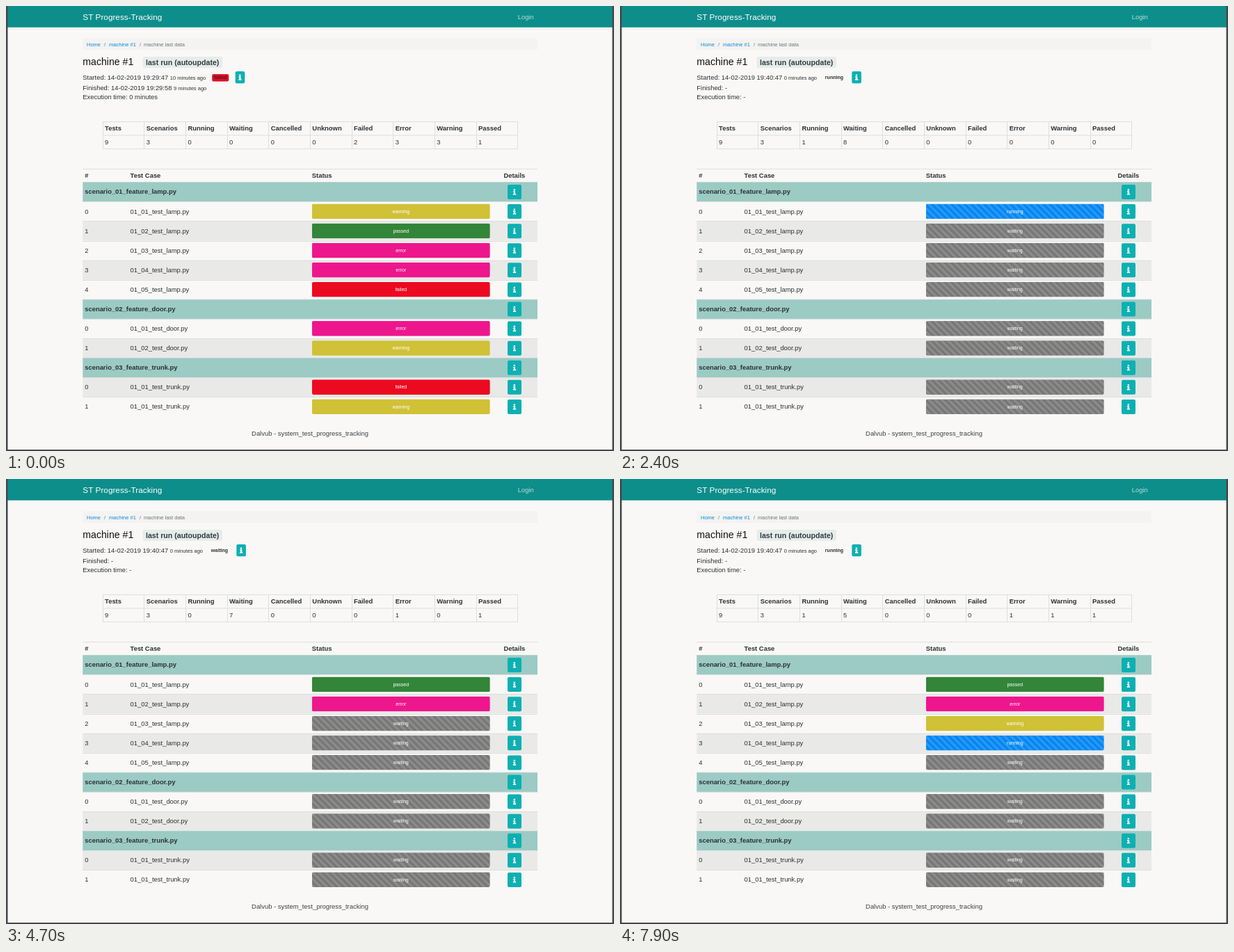
Recreate the animation shown at these times as an HTML page with a canvas. Size 874 by 640 pixels, loop 8000 ms.

```html
<!DOCTYPE html>
<html lang="en">
<head>
<meta charset="utf-8">
<title>Test progress</title>
<style>
  html, body { margin: 0; width: 100%; height: 100%; overflow: hidden; background: #f9f8f6; }
  canvas { display: block; width: 874px; height: 640px; }
</style>
</head>
<body>
<canvas id="stage" width="874" height="640"></canvas>
<script>
const ctx = document.getElementById('stage').getContext('2d');

const LOOP = 8000, TICK = 100;
const REM = 9.424, SMALL = REM * 0.8, TINY = REM * 0.75;
const INK = '#2c3034', LINE = '#dcdfe0', TEAL = '#0db0b2';
const LEFT = 110.3, RIGHT = 764;
const ROW_TOP = 253.3, ROW_H = 28.08;
const BAR_X = 439.8, BAR_W = 256, BAR_H = 21.7;

const COLORS = {
  warning: '#d0c136', passed: '#338539', error: '#ee168d',
  failed: '#ec0a20', running: '#0286f3', waiting: '#777777'
};
const LETTERS = { w: 'warning', p: 'passed', e: 'error', f: 'failed', r: 'running', '.': 'waiting' };

// Each step: start time, one letter per test, overall status
const STEPS = [
  [0, 'wpeefewfw', 'failed'],
  [500, 'r........', 'running'],
  [2500, 'p........', 'waiting'],
  [3000, 'pr.......', 'running'],
  [4500, 'pe.......', 'waiting'],
  [5000, 'per......', 'running'],
  [7000, 'pewr.....', 'running']
];

const HEADS = ['Tests', 'Scenarios', 'Running', 'Waiting', 'Cancelled',
  'Unknown', 'Failed', 'Error', 'Warning', 'Passed'];

const SCENARIOS = [
  ['scenario_01_feature_lamp.py', [1, 2, 3, 4, 5].map(n => `01_0${n}_test_lamp.py`)],
  ['scenario_02_feature_door.py', ['01_01_test_door.py', '01_02_test_door.py']],
  ['scenario_03_feature_trunk.py', ['01_01_test_trunk.py', '01_01_test_trunk.py']]
];

function rect(x, y, w, h, color) {
  ctx.fillStyle = color;
  ctx.fillRect(x, y, w, h);
}

function box(x, y, w, h, r, color) {
  ctx.fillStyle = color;
  ctx.beginPath();
  ctx.roundRect(x, y, w, h, r);
  ctx.fill();
}

// Draws text and returns the x where it ends
function text(str, x, y, { size = REM, color = INK, bold = false, align = 'left' } = {}) {
  ctx.font = `${bold ? 'bold ' : ''}${size}px "Liberation Sans", Arial, sans-serif`;
  ctx.textAlign = align;
  ctx.fillStyle = color;
  ctx.fillText(str, x, y);
  return x + ctx.measureText(str).width;
}

function infoButton(x, y, w, h) {
  box(x, y, w, h, 2, TEAL);
  const cx = x + w / 2, cy = y + h / 2;
  box(cx - 1.4, cy - 4.2, 2.5, 2.3, 0.7, '#fff');
  box(cx - 2.1, cy - 1.2, 3.2, 1.5, 0.4, '#fff');
  rect(cx - 1.2, cy - 1, 2.3, 4.4, '#fff');
  box(cx - 2.2, cy + 2.5, 4.4, 1.6, 0.4, '#fff');
}

function statusBar(status, y, shift) {
  ctx.save();
  ctx.beginPath();
  ctx.roundRect(BAR_X, y, BAR_W, BAR_H, 2.4);
  ctx.clip();
  rect(BAR_X, y, BAR_W, BAR_H, COLORS[status]);
  if (status === 'running' || status === 'waiting') {
    ctx.fillStyle = 'rgba(255,255,255,.15)';
    ctx.beginPath();
    for (let x = BAR_X + shift - 4 * REM; x < BAR_X + BAR_W; x += REM) {
      ctx.moveTo(x, y);
      ctx.lineTo(x + REM / 2, y);
      ctx.lineTo(x + REM / 2 + BAR_H, y + BAR_H);
      ctx.lineTo(x + BAR_H, y + BAR_H);
    }
    ctx.fill();
  }
  ctx.restore();
  text(status, BAR_X + BAR_W / 2, y + BAR_H / 2 + 2.3, { size: TINY, color: '#fff', align: 'center' });
}

function pageTop() {
  rect(0, 0, 874, 640, '#f9f8f6');
  rect(0, 0, 874, 30.7, '#0d8e8b');
  text('ST Progress-Tracking', LEFT, 19.6, { size: REM * 1.25, color: '#fff' });
  text('Login', 735.7, 18.7, { color: '#b9dddb' });

  box(LEFT, 46.3, RIGHT - LEFT, 16.7, 2, '#f3f3f1');
  const crumb = (s, x, color) => text(s, x, 57.5, { size: SMALL, color });
  crumb('Home', 116, '#0b8bdc');
  crumb('/', 141, '#6c757d');
  crumb('machine #1', 148, '#0b8bdc');
  crumb('/', 192, '#6c757d');
  crumb('machine last data', 198, '#6c757d');

  text('machine #1', LEFT, 85, { size: REM * 1.5, color: '#111' });
  box(196.7, 73, 114.2, 16, 2.4, '#e5edea');
  text('last run (autoupdate)', 201, 84.6, { size: REM * 1.125, bold: true, color: '#343a40' });
}

function runInfo(overall) {
  const done = overall === 'failed';
  const dated = (label, ago, y) =>
    text(ago, text(label + ' ', LEFT, y), y, { size: SMALL });

  let x = done
    ? dated('Started: 14-02-2019 19:29:47', '10 minutes ago', 105.5)
    : dated('Started: 14-02-2019 19:40:47', '0 minutes ago', 105.5);
  if (done) dated('Finished: 14-02-2019 19:29:58', '9 minutes ago', 121);
  else text('Finished: -', LEFT, 121);
  text('Execution time: ' + (done ? '0 minutes' : '-'), LEFT, 134.3);

  const pad = TINY * 0.4;
  x += 9;
  ctx.font = `bold ${TINY}px "Liberation Sans", Arial, sans-serif`;
  const w = ctx.measureText(overall).width + 2 * pad;
  if (done) box(x, 98, w, 10.5, 2.2, '#dc1228');
  text(overall, x + pad, 105.3, { size: TINY, bold: true, color: done ? '#5c1218' : INK });
  infoButton(x + w + 9.4, 94, 13.6, 17.2);
}

function summary(tests) {
  const x0 = 138.7, step = 59.65, y0 = 166, mid = 185.5, y1 = 205;
  const count = name => tests.filter(s => s === name.toLowerCase()).length;
  for (const y of [y0, mid, y1]) rect(x0, y, step * 10 + 0.6, 1, LINE);
  for (let i = 0; i <= 10; i++) rect(Math.round(x0 + i * step), y0, 1, y1 - y0 + 1, LINE);
  HEADS.forEach((head, i) => {
    const x = x0 + i * step + 3.4;
    const value = i === 0 ? tests.length : i === 1 ? SCENARIOS.length : count(head);
    text(head, x, 179.3, { bold: true });
    text(String(value), x, 198.8);
  });
}

function testTable(tests, shift) {
  const width = RIGHT - LEFT;
  rect(LEFT, 234, width, 1, LINE);
  [['#', 113.2], ['Test Case', 178.6], ['Status', 439.8], ['Details', 715.4]]
    .forEach(([s, x]) => text(s, x, 247.4, { bold: true }));

  let row = 0, test = 0;
  const nextRow = fill => {
    const y = ROW_TOP + row * ROW_H;
    if (fill) rect(LEFT, y, width, ROW_H, fill);
    rect(LEFT, Math.round(y), width, 1, fill === '#9bcbc4' ? '#b5d3ce' : LINE);
    infoButton(721, y + 3.7, 20, 21);
    row++;
    return y;
  };

  for (const [name, files] of SCENARIOS) {
    const top = nextRow('#9bcbc4');
    text(name, 113.2, top + 17, { bold: true });
    files.forEach((file, i) => {
      const y = nextRow(row % 2 ? null : '#e9e9e7');
      text(String(i), 113.2, y + 17.2);
      text(file, 178.6, y + 17.2);
      statusBar(tests[test++], y + 3.2, shift);
    });
  }
}

function pageBottom() {
  text('Dalvub - system_test_progress_tracking', 437, 618, { align: 'center', color: '#3c4044' });
  rect(0, 0, 2.5, 640, '#45484c');
  rect(871.5, 0, 2.5, 640, '#45484c');
  rect(0, 638, 874, 2, '#45484c');
}

function draw(time) {
  const t = Math.floor((time % LOOP) / TICK) * TICK;
  const [, letters, overall] = STEPS.filter(step => step[0] <= t).pop();
  const tests = [...letters].map(c => LETTERS[c]);
  const shift = REM * (1 - ((t + 500) % 1000) / 1000);

  pageTop();
  runInfo(overall);
  summary(tests);
  testTable(tests, shift);
  pageBottom();
}

function frame() {
  draw(performance.now());
  requestAnimationFrame(frame);
}
frame();
</script>
</body>
</html>
```
